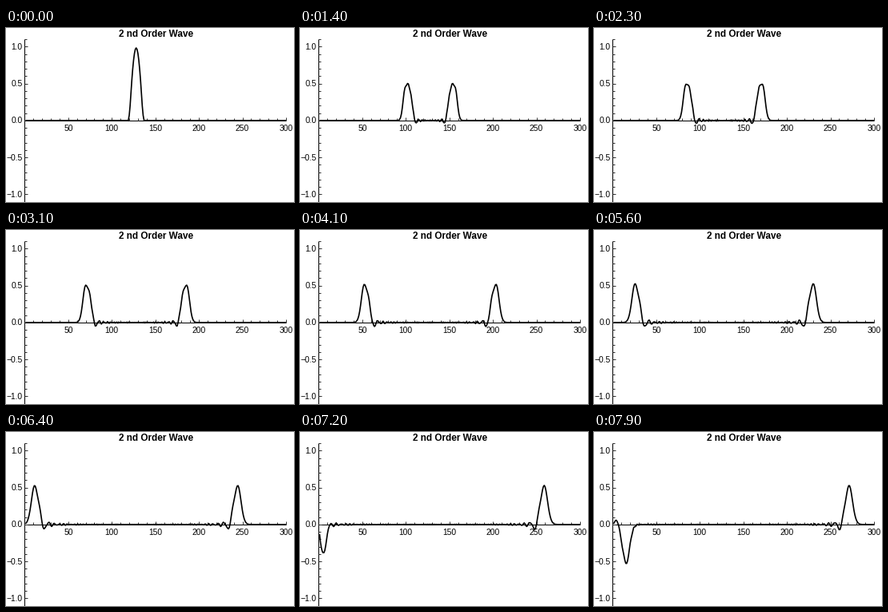
These frames come from a looping animation (360 px wide and 218 px high, 8000 ms). A matplotlib script:

```python
import matplotlib.pyplot as plt
import numpy as np
from matplotlib.animation import FuncAnimation

W, H, DPI = 360, 218, 100
FRAMES, INTERVAL = 80, 100
PX = 72 / DPI                 # points per pixel
X0, Y0 = 23.4, 115.9          # axes origin in pixels
SX, SY = 1.0885, 92.4         # pixels per data unit

N = 300
COURANT = 0.181
STEPS = 10                    # time steps per frame
LEAD = 5                      # steps taken before the first frame


def px(x):
    return X0 + SX * x


def py(y):
    return Y0 - SY * y


def solve():
    """Second-order leapfrog wave equation with fixed ends."""
    def lap(u):
        d = np.zeros_like(u)
        d[1:-1] = u[2:] - 2 * u[1:-1] + u[:-2]
        return d

    x = np.arange(N + 1)
    inside = (x >= 120) & (x <= 136)
    old = np.where(inside, np.sin(np.pi * (x - 120) / 16), 0.0)
    c2 = COURANT ** 2
    new = old + 0.5 * c2 * lap(old)
    history = [old, new]
    for _ in range(LEAD + STEPS * FRAMES):
        old, new = new, 2 * new - old + c2 * lap(new)
        history.append(new)
    return x[1:], np.array(history[LEAD::STEPS])[:, 1:]


fig = plt.figure(figsize=(W / DPI, H / DPI), dpi=DPI, facecolor="white")
ax = fig.add_axes([0, 0, 1, 1])
ax.set_xlim(0, W)
ax.set_ylim(H, 0)
ax.axis("off")


def line(xs, ys, color="black", width=1.0):
    return ax.plot(xs, ys, color=color, lw=width * PX,
                   solid_capstyle="butt", solid_joinstyle="round")[0]


def label(x, y, text, size=10.3, **kw):
    ax.text(x, y, text, fontsize=size * PX, family="Liberation Sans",
            va="baseline", **kw)


line([X0, px(N)], [Y0, Y0])
line([X0, X0], [py(1.1), py(-1.1)])

for v in range(10, N + 1, 10):
    major = v % 50 == 0
    line([px(v)] * 2, [Y0, Y0 - (4 if major else 2.5)], "#333333")
    if major:
        label(px(v), 128.6, str(v), ha="center")

for i in range(-11, 12):
    y = i / 10
    major = i % 5 == 0
    line([X0, X0 + (4 if major else 2.5)], [py(y)] * 2, "#333333")
    if major:
        label(20.4, py(y) + 3.4, f"{y:.1f}".replace("-", "\u2212"), ha="right")

label(187.3, 11, "2 nd Order Wave", 11.7, weight="bold", ha="center")

grid, waves = solve()
curve = line(px(grid), py(waves[0]), width=1.65)


def update(i):
    curve.set_ydata(py(waves[i]))
    return (curve,)


anim = FuncAnimation(fig, update, frames=FRAMES, interval=INTERVAL,
                     repeat=True, repeat_delay=0)
plt.show()
```
